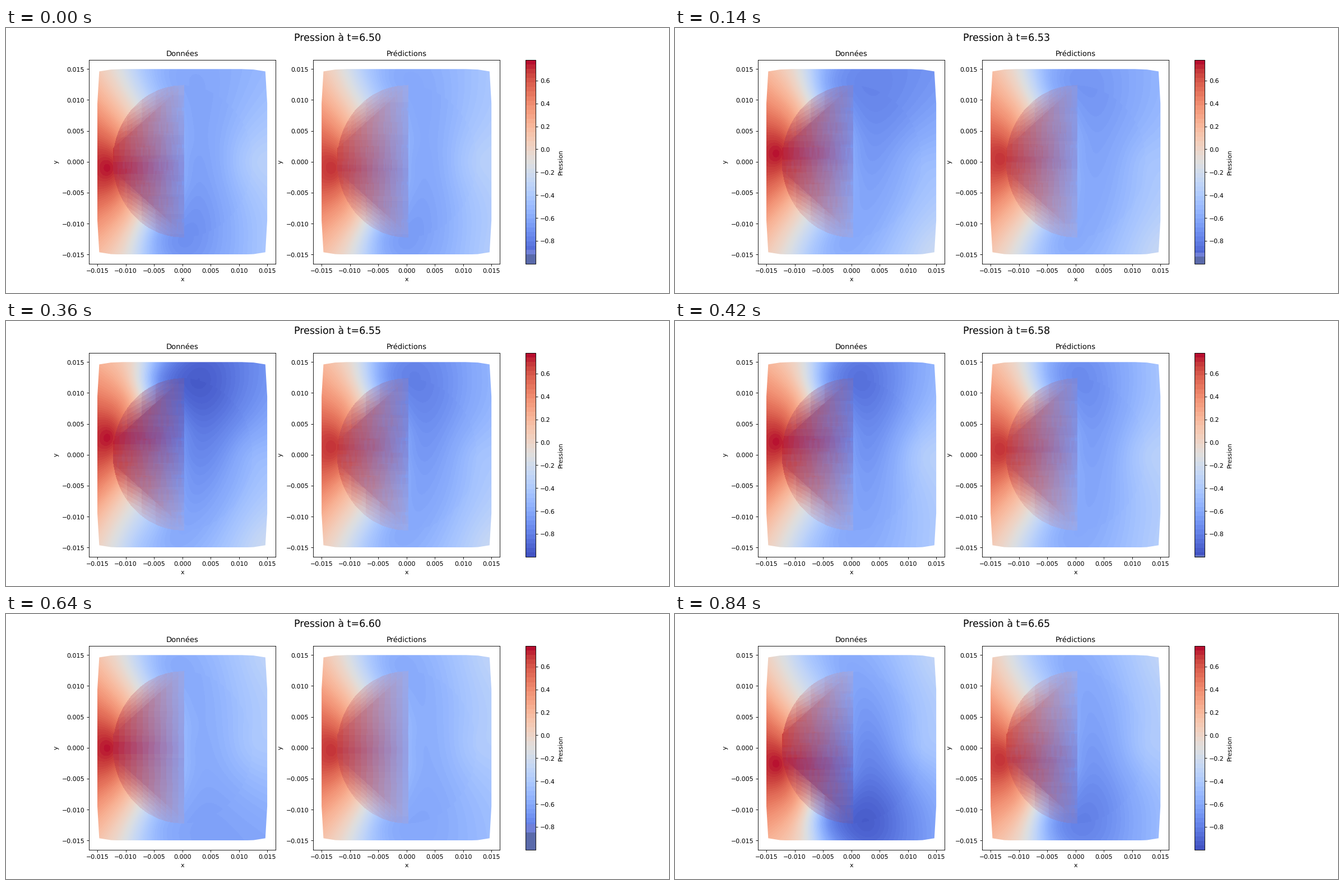
Recreate the animation shown at these times as a matplotlib script. Size 1183 px wide and 473 px high, loop 980 ms.

```python
import numpy as np
import matplotlib.pyplot as plt
from matplotlib.animation import FuncAnimation
from matplotlib.cm import ScalarMappable
from matplotlib.colors import ListedColormap, Normalize
from matplotlib.patches import Polygon

DPI = 80
SCALE = 78.87 / DPI
FRAMES = 7            # one vortex shedding period
HALF = 0.015          # half width of the domain
RADIUS = 0.82         # cylinder radius in units of HALF
STEP = 0.02           # pressure step between contour bands

plt.rcParams.update({"font.family": "DejaVu Sans", "font.size": 10 * SCALE,
                     "text.hinting": "none"})


def soft_coolwarm(n):
    rgb = plt.get_cmap("coolwarm")(np.linspace(0, 1, n))[:, :3]
    return ListedColormap(0.96 * rgb + 0.04)


norm = Normalize(-1, 0.781)
cmap = soft_coolwarm(256)
u, v = np.meshgrid(np.linspace(-1, 1, 304), np.linspace(-1, 1, 332))


def color(p):
    banded = (np.floor(p / STEP) + 0.5) * STEP
    return cmap(norm(banded))[..., :3]


def swing(i, start):
    return np.cos(2 * np.pi * (i - start) / FRAMES)


def sides(i, gain):
    """Per side: sign, left corner, suction and right corner pressure."""
    shed, wake = swing(i, 2.2), swing(i, 1.55)
    for sign in (1, -1):
        yield (sign, .13 + .11 * gain * sign * shed,
               -.57 - .39 * gain * max(sign * shed, 0),
               -.30 - .17 * gain - .26 * gain * sign * wake)


def controls(i, gain, peak, s):
    """Points (u, v, pressure) that shape the flow field."""
    top, bottom = sides(i, gain)
    mid = (top[2] + bottom[2]) / 2
    right = -.34 - .2 * gain * swing(i, 1.55) ** 2
    pts = [(-1, s, peak - .03), (-.85, s, peak), (.05, 0, mid + .05),
           (RADIUS, 0, .9 * right + .1 * mid), (1, 0, right)]
    for sign, left, low, corner in (top, bottom):
        lean = sign * s
        core = -.25 + (-low - .5)
        shift = .35 * (core + .1 + lean)
        pts += [
            (-1, sign, left),
            (-1, .5 * (sign + s), .5 * (peak + left)),
            (-.8, .5 * sign, .3 * peak + .7 * left + .6 * lean),
            (-.7 + shift, sign, .7 * left + .3 * low),
            (-.45 + shift, sign, .3 * left + .7 * low),
            (-.6, .6 * sign, .03 + .9 * lean),
            (-.3, .8 * sign, .5 * low - .2),
            (core, .88 * sign, low),
            (.05, .4 * sign, .4 * low + .6 * mid + .03),
            (1, sign, corner),
        ]
    return np.array(pts)


def kernel(dx, dy):
    return np.sqrt(dx * dx + dy * dy + .15 ** 2)


def flow(points):
    px, py, val = points.T
    n = len(val)
    mat = np.ones((n + 1, n + 1))
    mat[:n, :n] = kernel(px[:, None] - px, py[:, None] - py)
    mat[n, n] = 0
    wts = np.linalg.solve(mat, np.append(val, 0))
    field = np.full(u.shape, wts[n])
    for x, y, w in zip(px, py, wts):
        field += w * kernel(u - x, v - y)
    return field


def picture(i, gain, peak, bias):
    s = bias + .18 * gain * swing(i, 2.2)
    t, b = (side[2] for side in sides(i, gain))
    disc = u * u + v * v < RADIUS ** 2
    img = color(flow(controls(i, gain, peak, s)) - .01 * (disc & (u > 0)))

    # folded triangles over the left half of the cylinder
    k = np.clip((u + RADIUS) / .84, 0, 1)
    above = np.abs(v - .02) - (.12 + .69 * k)
    inside = (u > -RADIUS) & (u < .02) & (above < 0)
    lens = disc & (u < .02) & ~inside

    rough = np.clip(4 * abs(t - b) + .1, 0, 1)
    mix = 0
    for j, sign in enumerate((1, -1)):
        saw = (sign * 2.5 * v + .31 * np.floor(6 * k + .5 * j) + .5 * j) % 1
        mix = mix + np.floor(12 * k + 1.2 * rough * (saw - .5)) / 24
    mix = np.clip(.07 + .87 * mix, 0, .95)[..., None]

    hot = color(peak - .3 * np.abs(v - s))
    cold = color((t + b) / 2 + (t - b) / 2 * np.clip(v / RADIUS, -1, 1))
    fold = (1 - mix) * hot + mix * cold
    img[inside] = fold[inside]

    # the fold thins out in stripes towards the rim
    stripe = np.floor(20 * above + rough * ((5 * k) % 1)) / 20
    share = np.clip(.85 - 2.2 * stripe, .25, .9)[..., None]
    img[lens] = ((1 - share) * img + share * fold)[lens]
    return np.clip(img, 0, 1)


def outline():
    corner = [(1, .63), (.978, .975), (.84, .995), (.7, 1)]
    quads = [(1, 1, 1), (-1, 1, -1), (-1, -1, 1), (1, -1, -1)]
    return [(sx * x * HALF, sy * y * HALF)
            for sx, sy, order in quads for x, y in corner[::order]]


fig, axs = plt.subplots(1, 2, figsize=(1183 / DPI, 473 / DPI), dpi=DPI)
heading = fig.suptitle("", fontsize=16 * SCALE)


def panel(ax, name):
    im = ax.imshow(np.ones(u.shape + (3,)), origin="lower", aspect="auto",
                   extent=(-HALF, HALF, -HALF, HALF), interpolation="nearest")
    im.set_clip_path(Polygon(outline(), transform=ax.transData))
    ticks = np.arange(-3, 4) * .005
    ax.set(xlim=(-.0165, .0165), ylim=(-.0165, .0165), xticks=ticks,
           yticks=ticks, xlabel="x", ylabel="y")
    ax.set_title(name, fontsize=12 * SCALE)
    return im


data = panel(axs[0], "Données")
model = panel(axs[1], "Prédictions")
bar = fig.colorbar(ScalarMappable(norm, soft_coolwarm(45)), ax=list(axs),
                   label="Pression", ticks=np.arange(-4, 4) * .2)
pale = bar.ax.axhspan(-1, -.9, color="#7080d8", lw=0)
dark = bar.ax.axhspan(-1, -.95, color="#5a6aaa", lw=0)


def draw(i):
    heading.set_text(f"Pression à t={6.5 + .025 * i + 1e-6:.2f}")
    data.set_data(picture(i, gain=1, peak=.76, bias=0))
    model.set_data(picture(i, gain=.6, peak=.71, bias=-.03))
    # the bar's lowest colours are missing while suction is weak
    gap = max(.8 - abs(swing(i, 2.2)), 0)
    pale.set_height(.3 * gap)
    dark.set_height(.2 * gap)
    return data, model


anim = FuncAnimation(fig, draw, frames=FRAMES, interval=140, repeat=True)
plt.show()
```
